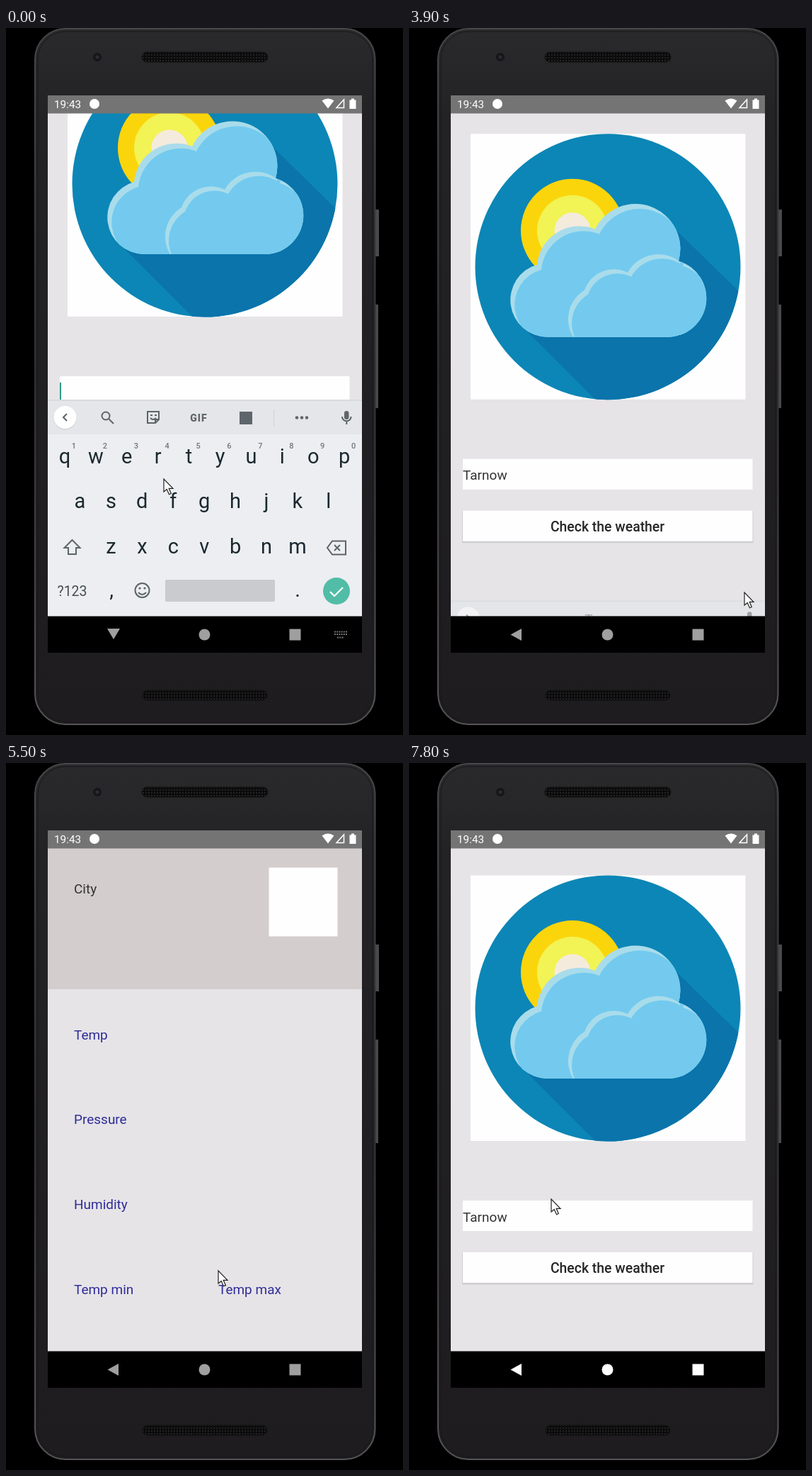
Animation, 561 px wide and 997 px high, one loop 8 s. Source, as an HTML page:

```html
<!DOCTYPE html>
<html lang="en">
<head>
<meta charset="utf-8">
<title>Weather app</title>
<style>
  html, body { margin: 0; width: 100%; height: 100%; overflow: hidden; background: #000; }
  svg { display: block; font-family: Roboto, sans-serif; font-size: 19px; }
  .mid { text-anchor: middle; }
  .label { fill: #2f2d98; }
  .value { font-size: 32px; fill: #111; }
  .key { font-size: 29px; fill: #1b292f; text-anchor: middle; }
  .hint { font-size: 11px; font-weight: 500; fill: #70777c; text-anchor: middle; }
  .line { fill: none; stroke: #5c6468; stroke-width: 2; }
  .solid { fill: #5f666b; }
</style>
</head>
<body>
<svg width="561" height="997" viewBox="0 0 561 997">
  <defs>
    <linearGradient id="body" x2="0" y2="1">
      <stop stop-color="#2a292b"/><stop offset=".12" stop-color="#232224"/><stop offset="1" stop-color="#1e1c1f"/>
    </linearGradient>
    <linearGradient id="rim" x2="0" y2="1">
      <stop stop-color="#48484a"/><stop offset=".5" stop-color="#303032"/><stop offset="1" stop-color="#555557"/>
    </linearGradient>
    <pattern id="mesh" width="4" height="4" patternUnits="userSpaceOnUse">
      <rect width="4" height="4" fill="#0b0b0c"/><circle cx="2" cy="2" r="1" fill="#2b2a2c"/>
    </pattern>
    <clipPath id="screen"><rect x="59" y="95" width="444" height="786"/></clipPath>
    <clipPath id="disc"><circle cx="281" cy="346" r="187.5"/></clipPath>
    <path id="back" d="M195 445A52 52 0 0 1 181 343A60 60 0 0 1 263 293A63.400 63.400 0 0 1 381 338A54.600 54.600 0 0 1 366 445Z"/>
    <path id="front" d="M232 445A48 48 0 0 1 248 379A44 44 0 0 1 309 354A50 50 0 0 1 383 339L390 445Z"/>
    <clipPath id="backClip"><use href="#back"/></clipPath>
    <path id="drop" d="M0-10C2-5 5-2 5 2A5 5 0 0 1-5 2C-5-2-2-5 0-10Z"/>
  </defs>

  <!-- phone -->
  <path d="M522 256h5v66h-5zM522 390h4v146h-4z" fill="#4a4a4c"/>
  <rect x="41" y="1" width="480.500" height="981" rx="43" fill="url(#body)" stroke="url(#rim)" stroke-width="2"/>
  <rect x="45" y="5" width="473" height="973" rx="39" fill="none" stroke="#18171a"/>
  <rect x="192" y="34" width="178" height="14" rx="7" fill="url(#mesh)" stroke="#111"/>
  <rect x="193" y="934" width="176" height="14" rx="7" fill="url(#mesh)" stroke="#111"/>
  <circle cx="129" cy="41" r="6" fill="#161618"/><circle cx="129" cy="41" r="2.500" fill="#2a2c35"/>

  <g clip-path="url(#screen)">
    <rect x="59" y="95" width="444" height="786"/>

    <g id="home">
      <path d="M59 95h444v735H59z" fill="#e6e4e7"/>
      <g id="pan">
        <path d="M87 158.500h388.500V533H87z" fill="#fefefe"/>
        <g clip-path="url(#disc)">
          <path d="M90 150h390v390H90z" fill="#0c86b6"/>
          <path d="M370 287L490 404V560H290L160 430Z" fill="#0a74ab"/>
        </g>
        <circle cx="231" cy="295" r="73" fill="#fbd50b"/>
        <circle cx="231" cy="295" r="50" fill="#f2f354"/>
        <circle cx="231" cy="295" r="25.500" fill="#f4ebdd"/>
        <use href="#back" fill="#a9dceb"/>
        <g clip-path="url(#backClip)" fill="#73caee">
          <use href="#back" x="6" y="7"/>
          <use href="#front" fill="#a9dceb"/>
          <use href="#front" x="5" y="6"/>
        </g>
        <path d="M76 617h409.500v43H76z" fill="#fefefe"/>
        <text id="input" x="76" y="646.500" fill="#333"></text>
        <path id="underline" stroke="#444"/>
        <rect id="caret" y="626" width="2" height="26" fill="#2b9a8a"/>
        <path d="M75 691h411.500v44.500H75z" fill="#cfcdd0"/>
        <path d="M76 690h409.500v43H76z" fill="#fefefe"/>
        <text x="280.500" y="719" class="mid" font-weight="500" font-size="19.400" fill="#262626">Check the weather</text>
      </g>
      <path d="M59 95h444v25.500H59z" fill="#757475"/>
      <path d="M59 829.500h444v60H59z"/>
    </g>

    <g id="details">
      <path d="M59 95h444v735H59z" fill="#e6e4e7"/>
      <path d="M59 95h444v224H59z" fill="#d4cdce"/>
      <path d="M59 95h444v25.500H59z" fill="#757475"/>
      <path d="M59 829.500h444V881H59z"/>
      <path d="M371.500 147.500h97v97h-97z" fill="#fefefe"/>
      <text x="96" y="184" fill="#333">City</text>
      <g class="label">
        <text x="96" y="390">Temp</text><text x="96" y="509.500">Pressure</text>
        <text x="96" y="629.500">Humidity</text><text x="96" y="749">Temp min</text><text x="300" y="749">Temp max</text>
      </g>
      <g id="data" class="value">
        <text x="96" y="221" fill="#23219a">Tarnów</text>
        <text x="270" y="282" class="mid" font-size="27.500">19:43:44</text>
        <text x="96" y="428">11.67 °C</text><text x="96" y="547.500">1008 hPa</text>
        <text x="96" y="667.500">57.0 %</text><text x="96" y="787">11.67 °C</text><text x="300" y="787">11.67 °C</text>
        <g id="sun" transform="translate(439 184)"><circle r="9" fill="#ee1c1c" stroke="#f5a51c" stroke-width="2"/></g>
        <path d="M394 208A10 10 0 0 1 389 190A15 15 0 0 1 416 180A14 14 0 0 1 430 194A8 8 0 0 1 440 208Z" fill="#f1f1f3" stroke="#d4d4d8"/>
        <path d="M393 208Q389 203 396 202H442Q448 195 448 203Q447 208 440 208Z" fill="#bfc0c8"/>
        <g fill="#12309b">
          <use href="#drop" transform="translate(414 206) scale(1.300)"/><use href="#drop" x="401" y="215"/>
          <use href="#drop" x="431" y="212"/><use href="#drop" transform="translate(425 197) scale(.8)"/>
        </g>
      </g>
    </g>

    <g id="keyboard">
      <path d="M59 524h444v306H59z" fill="#d9dadd"/>
      <path d="M59 526h444v304H59z" fill="#e4e6e9"/>
      <path d="M59 573h444v257H59z" fill="#eceef2"/>
      <circle cx="83.500" cy="550" r="16.500" fill="#d4d7da"/><circle cx="83.500" cy="549" r="16" fill="#fff"/>
      <path id="chevron" class="line"/>
      <g id="tools">
        <circle cx="141" cy="547" r="5.500" class="line"/><path d="M145 551l7 7" class="line" stroke-width="3"/>
        <path d="M200 541h16v11l-5 5h-11zM216 552h-5v5M204 550q4 4 8 0" class="line"/>
        <path d="M204 545h3v2h-3zM210 545h3v2h-3z" class="solid"/>
        <text x="272.500" y="554.500" class="mid solid" font-size="14" font-weight="900" letter-spacing="1">GIF</text>
        <path d="M330 541h18v18h-18z" class="solid"/>
        <path d="M378.500 538v24" stroke="#cfd2d5"/>
        <g class="solid"><circle cx="411" cy="549.500" r="2.300"/><circle cx="418" cy="549.500" r="2.300"/><circle cx="425" cy="549.500" r="2.300"/></g>
      </g>
      <g id="words" class="mid" fill="#70777b">
        <text x="156" y="556.500"></text><text x="279.500" y="556.500"></text><text x="401.500" y="556.500"></text>
        <path id="dividers" d="M214.500 537v25M344.500 537v25" stroke="#cdd0d3"/>
      </g>
      <rect x="478" y="540" width="6.500" height="12" rx="3.200" class="solid"/>
      <path d="M475 548a6.300 6.300 0 0 0 12.600 0M481.300 554v5" class="line"/>
      <g id="keys"></g>
      <path d="M93.500 722l11 11h-5.500v9h-11v-9h-5.500z" class="line"/>
      <path d="M461 723.500h19v19h-19l-7-9.500zM464 729l8 8m0-8l-8 8" class="line"/>
      <text x="93.500" y="801" class="mid" font-size="19.500" fill="#454e53">?123</text>
      <circle cx="192.500" cy="793" r="10" class="line"/>
      <path d="M187 796q5.500 6 11 0" class="line"/>
      <circle cx="189" cy="790" r="1.600" class="solid"/><circle cx="196" cy="790" r="1.600" class="solid"/>
      <rect x="225" y="778" width="155" height="31" rx="2" fill="#c9cbcf"/>
      <circle cx="467" cy="794" r="19" fill="#51bda6"/>
      <path d="M458 795l6 6 12-12" fill="none" stroke="#fff" stroke-width="2.200"/>
    </g>

    <!-- system bars -->
    <g fill="#fff">
      <text x="68" y="113" font-size="15.300">19:43</text>
      <circle cx="125" cy="107" r="7"/>
      <path d="M446.500 102.500Q455 96.500 463.500 102.500L455 113.500Z"/>
      <path d="M467 112.500L477.500 101v11.500z" fill="none" stroke="#fff" stroke-width="1.500"/>
      <path d="M485.500 101.500h2.500v-2h4v2h2.500v12.500h-9z"/>
    </g>
    <path id="navBack" d="M59 829.500h444V881H59z"/>
    <g id="nav">
      <path id="backIcon"/>
      <circle cx="280.500" cy="855.500" r="8"/><path d="M400.500 847.500h16v16h-16z"/>
    </g>
    <path id="imeIcon" d="M464 851.500h18M464 855h18M468 859.500h10" stroke="#777" stroke-width="2" stroke-dasharray="2 1.200"/>
  </g>
  <path id="mouse" d="M0 0V18L4.200 14.500 7.500 21.800 10.300 20.500 7.200 13.300H13Z" fill="#fff" stroke="#222" stroke-width="1.200"/>
</svg>
<script>
const $ = id => document.getElementById(id);
const clamp = v => Math.max(0, Math.min(1, v));
const show = (id, on) => $(id).style.display = on ? '' : 'none';
const put = (id, attrs) => { for (const k in attrs) $(id).setAttribute(k, attrs[k]); };

const label = (cls, x, y, s) => `<text class="${cls}" x="${x}" y="${y}">${s}</text>`;
const row = (chars, x, y, cls = 'key') => [...chars].map((c, i) => label(cls, x + i * 43.9, y, c)).join('');
$('keys').innerHTML = row('qwertyuiop', 83, 614) + row('1234567890', 96, 593, 'hint') +
  row('asdfghjkl', 104.500, 677) + row('zxcvbnm', 148.500, 741) + label('key', 149, 802, ',') + label('key', 412, 802, '.');
for (let a = 0; a < 360; a += 36)
  $('sun').insertAdjacentHTML('afterbegin', `<path d="M-3-10L0-18 3-10Z" fill="#f6b417" transform="rotate(${a})"/>`);

// start time, typed text, suggestions
const typing = [
  [0, '', []],
  [1000, 'T', ['T', 'The', 'To']],
  [1200, 'Ta', ['Ta', 'Take', 'Talk']],
  [1500, 'Tar', ['Tar', 'Tart', 'Tariff']],
  [1800, 'Tarn', ['Tarn', 'Tarnish', 'Tarnished']],
  [2000, 'Tarno', ['Tarno', 'Tarnow', 'Tarnish']],
  [2300, 'Tarnow', ['', 'Tarnow', '']]
];
const mousePath = [
  [0, 223, 636], [2700, 223, 636], [3200, 463, 743], [3600, 474, 796], [3900, 474, 796], [4500, 334, 729],
  [5000, 300, 716], [5900, 300, 716], [6500, 157, 852], [7100, 157, 852], [7700, 207, 643], [7800, 201, 615], [8000, 201, 615]
];
const caretOn = [[0, 300], [800, 2800], [3300, 3800], [4700, 5600]];
const OPEN = 5125, CLOSE = 7025, HIDE = 3650;

const zoom = s => `translate(281 488) scale(${s}) translate(-281 -488)`;
const settle = (t, start) => 1 - (1 - clamp((t - start) / 400)) ** 5;
const fade = (t, start) => clamp((t - start) / 120);

function draw(t) {
  const [, text, words] = typing.findLast(s => t >= s[0]);
  $('input').textContent = text;
  const end = 76 + (text ? $('input').getComputedTextLength() : 0);
  put('caret', { x: end });
  show('caret', caretOn.some(([a, b]) => t >= a && t < b));
  put('underline', { d: `M76 648.500H${end}` });
  show('underline', text && t < HIDE);

  show('tools', !text);
  show('words', text);
  show('dividers', words[0]);
  document.querySelectorAll('#words text').forEach((el, i) => el.textContent = words[i] || '');
  put('chevron', { d: text ? 'M81 544l5 5-5 5' : 'M86 544l-5 5 5 5' });

  const hide = clamp((t - HIDE) / 300), eased = hide * hide * (3 - 2 * hide);
  put('keyboard', { transform: `translate(0 ${306 * eased})`, opacity: 1 - eased * .5 });
  show('keyboard', hide < 1);
  put('pan', { transform: `translate(0 ${-126 * (1 - eased)})` });
  show('imeIcon', hide === 0);
  show('navBack', hide < 1);
  put('backIcon', { d: hide === 0 ? 'M143 847h18l-9 15z' : 'M143.500 855.500L159 847v17z' });
  put('nav', { fill: t > CLOSE ? '#fff' : '#9f9f9f' });

  const closing = t > CLOSE;
  const p = settle(t, closing ? CLOSE : OPEN);
  put('home', { transform: zoom(closing ? 1.1 - .1 * p : 1 + .05 * p) });
  put('details', {
    transform: zoom(closing ? 1 - .1 * p : .85 + .15 * p),
    opacity: closing ? 1 - fade(t, CLOSE) : fade(t, OPEN)
  });
  show('data', t >= 6000);

  const i = mousePath.findIndex(k => k[0] > t);
  const [t0, x0, y0] = mousePath[i - 1], [t1, x1, y1] = mousePath[i];
  const f = (t - t0) / (t1 - t0);
  put('mouse', { transform: `translate(${x0 + (x1 - x0) * f} ${y0 + (y1 - y0) * f})` });
}

// The screen refreshes ten times a second
function tick() {
  draw(Math.floor(performance.now() % 8000 / 100) * 100);
  requestAnimationFrame(tick);
}
tick();
</script>
</body>
</html>
```
